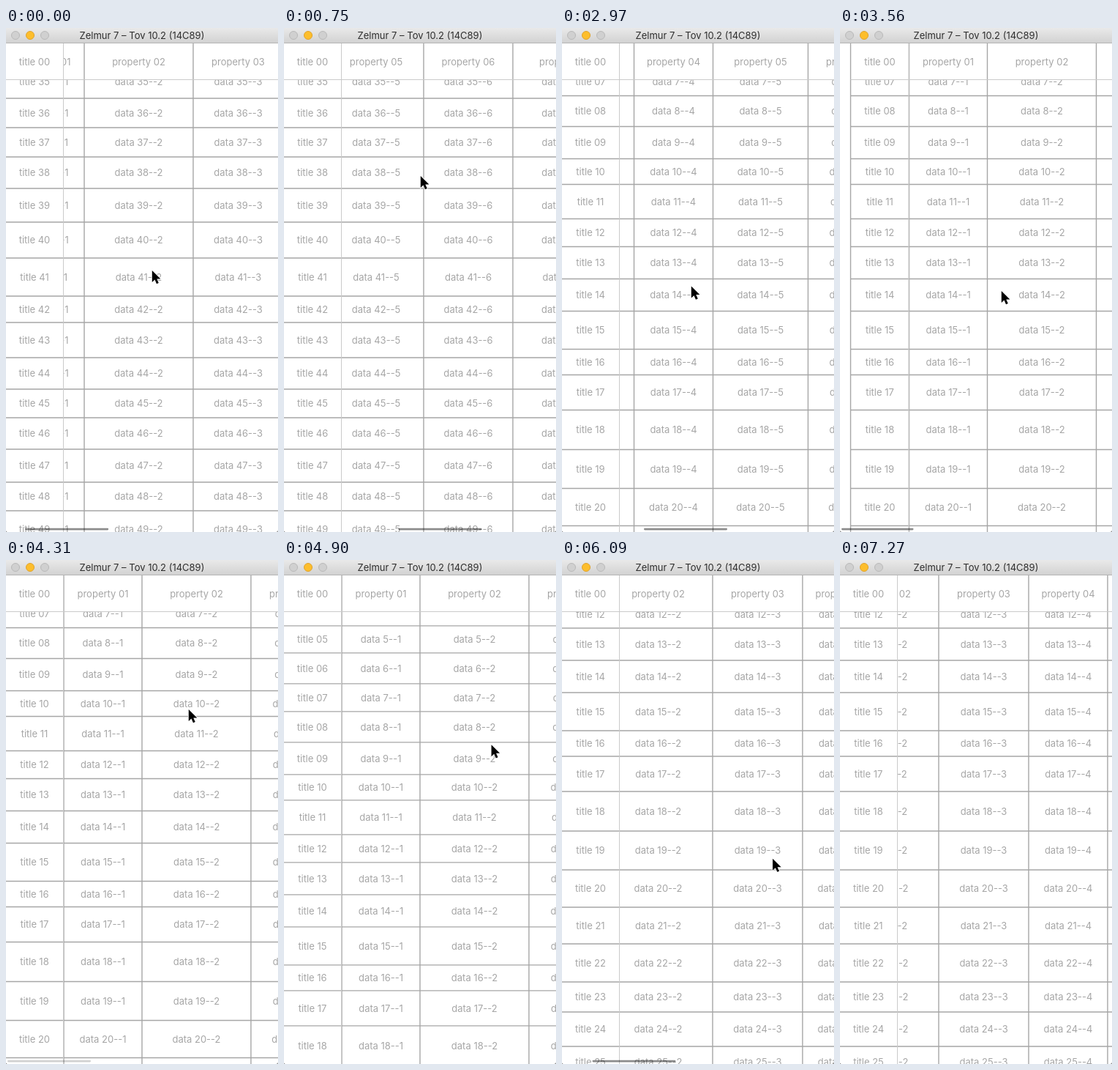
An HTML page for the animation above (7.37 s loop, 372 by 688 pixels).

```html
<!DOCTYPE html>
<html lang="en">
<head>
<meta charset="utf-8">
<title>Scrolling table</title>
<style>
  html, body { margin: 0; width: 100%; height: 100%; overflow: hidden; background: #777; }
  svg { display: block; border-radius: 0 0 3px 3px; background: #fff; }
  text { font: 13px Inter, "Liberation Sans", sans-serif; fill: #a6a6a6; text-anchor: middle; }
  .bar-title { fill: #2e2e2e; }
  .grid { stroke: #a6a6a6; stroke-width: 1.4; }
  .edge { stroke: #cacaca; stroke-width: 1; }
  .paper { fill: #fff; }
</style>
</head>
<body>
<svg id="stage" width="372" height="688" viewBox="0 0 372 688">
  <defs>
    <linearGradient id="chrome" x2="0" y2="1">
      <stop offset="0" stop-color="#e9e9e9"/>
      <stop offset="1" stop-color="#d1d1d1"/>
    </linearGradient>
  </defs>
  <g id="body"></g>
  <g id="columns"></g>
  <g id="side"><rect class="paper" x="-1" y="0" width="79.5" height="688"/><g id="titles"></g></g>
  <rect class="paper" y="21" width="372" height="49.7"/>
  <g id="header"></g>
  <g id="corner"><rect class="paper" x="-1" y="21" width="79.5" height="49.5"/></g>
  <rect id="thumb" y="682.8" height="2.6" rx="1.3" fill="#000"/>
  <g>
    <rect width="372" height="21" fill="url(#chrome)"/>
    <rect y="20" width="372" height="1" fill="#b4b4b4"/>
    <g stroke-width="1">
      <circle cx="13" cy="10" r="5.5" fill="#d0d0d0" stroke="#b9b9b9"/>
      <circle cx="33" cy="10" r="5.5" fill="#fdbe2c" stroke="#e0a32c"/>
      <circle cx="53" cy="10" r="5.5" fill="#d0d0d0" stroke="#b9b9b9"/>
    </g>
    <text class="bar-title" x="186" y="15">Zelmur 7 – Tov 10.2 (14C89)</text>
  </g>
  <path id="cursor" d="M0 0V16L3.7 12.6L6.2 18.2L9 17L6.5 11.5H11.6Z" stroke="#fff" stroke-width="1.6" paint-order="stroke"/>
</svg>
<script>
const LOOP = 7370, STEP = 148.37, LAST = 49;
const TOP = 71, SIDE = 79, WIDTH = 1200;

const columnWidths = [107, 149, 123, 108, 130, 122, 144, 119, 119];
const rowHeights = [
  44, 35, 40, 47, 37, 42, 38, 42, 44, 35, 47, 38, 44, 44, 52, 35, 48, 54, 53, 51,
  50, 52, 41, 47, 42, 45, 37, 50, 44, 39, 48, 43, 52, 40, 45, 40, 40, 43, 46, 49,
  52, 36, 48, 43, 39, 43, 45, 39, 50
];

// Each key is a step followed by its values
const scrollX = [
  [0, 79], [5, 505], [7, 600], [15, 600], [19, 440], [23, 118], [24, -15.5],
  [28, 0], [39, 0], [40, 101], [43, 185], [46, 200]
];
const scrollY = [
  [8, 1520], [9, 1440], [11, 850], [13, 350], [14, 261.5], [31, 261.5],
  [34, 90], [36, 0], [37, 70], [39, 467]
];
const pointer = [
  [0, 199, 330], [3, 166, 255], [5, 186, 201], [7, 178, 196], [8, 178, 196],
  [14, 266, 326], [15, 266, 326], [19, 165, 350], [24, 220, 358], [29, 249, 203],
  [31, 270, 10], [36, 302, 613], [39, 306, 380], [42, 278, 420], [47, 339, 664],
  [48, 343, 671], [49, 345, 710]
];
const thumbGlow = [[8, 1], [11, 0], [15, 0], [16, 1], [26, 1], [31, 0], [39, 0], [40, 1], [43, 1], [46, 0]];

const $ = id => document.getElementById(id);
const pad = n => String(n).padStart(2, "0");

function add(parent, tag, attrs, label) {
  const node = document.createElementNS("http://www.w3.org/2000/svg", tag);
  for (const name in attrs) node.setAttribute(name, attrs[name]);
  if (label) node.textContent = label;
  parent.append(node);
}
const line = (parent, x1, y1, x2, y2, kind = "grid") =>
  add(parent, "line", { x1, y1, x2, y2, class: kind });
const write = (parent, x, middle, label) =>
  add(parent, "text", { x, y: middle + 4.7 }, label);

// Turns sizes into { end, mid } spans
function spans(sizes, from) {
  return sizes.map(size => {
    from += size;
    return { end: from, mid: from - size / 2 };
  });
}

function build() {
  const columns = spans(columnWidths, SIDE), rows = spans(rowHeights, TOP);
  line($("body"), -1, TOP, WIDTH, TOP);
  line($("titles"), -1, TOP, SIDE - .5, TOP);
  rows.forEach((row, r) => {
    line($("body"), -1, row.end, WIDTH, row.end);
    line($("titles"), -1, row.end, SIDE - .5, row.end);
    write($("titles"), 39, row.mid, "title " + pad(r + 1));
    columns.forEach((col, c) => write($("body"), col.mid, row.mid, `data ${r + 1}--${c + 1}`));
  });
  line($("columns"), SIDE, TOP, SIDE, 688);
  line($("header"), SIDE, 21, SIDE, TOP);
  columns.forEach((col, c) => {
    line($("columns"), col.end, TOP, col.end, 688);
    line($("header"), col.end, 21, col.end, TOP);
    write($("header"), col.mid, 46, "property " + pad(c + 1));
  });
  line($("side"), -1, TOP, -1, 688);
  line($("side"), 78.5, TOP, 78.5, 688, "edge");
  const corner = $("corner");
  write(corner, 39, 46, "title 00");
  line(corner, -1, 21, -1, TOP);
  line(corner, 78.5, 21, 78.5, TOP, "edge");
  line(corner, -1, 70.5, 373, 70.5, "edge");
}

function valuesAt(track, step) {
  const found = track.findIndex(key => key[0] >= step);
  const next = found < 0 ? track.length - 1 : found;
  const b = track[next], a = found > 0 ? track[next - 1] : b;
  const part = a === b ? 0 : (step - a[0]) / (b[0] - a[0]);
  return a.slice(1).map((v, i) => v + (b[i + 1] - v) * part);
}

const move = (id, x, y) => $(id).setAttribute("transform", `translate(${x} ${y})`);

function draw(time) {
  const step = Math.min(LAST, Math.floor(time / STEP + .03));
  const [sx] = valuesAt(scrollX, step), [sy] = valuesAt(scrollY, step);
  const [px, py] = valuesAt(pointer, step), [glow] = valuesAt(thumbGlow, step);
  const pull = Math.max(0, -sx);
  move("body", -sx, -sy);
  move("columns", -sx, 0);
  move("header", -sx, 0);
  move("titles", 0, -sy);
  move("side", pull, 0);
  move("corner", pull, 0);
  move("cursor", px + .8, py + 1);
  const thumb = $("thumb");
  thumb.setAttribute("x", 2 + Math.max(0, sx) * .306);
  thumb.setAttribute("width", 114 - pull);
  thumb.setAttribute("opacity", glow * .45);
}

build();
const begin = performance.now();
function tick() {
  draw((performance.now() - begin) % LOOP);
  requestAnimationFrame(tick);
}
tick();
</script>
</body>
</html>
```
